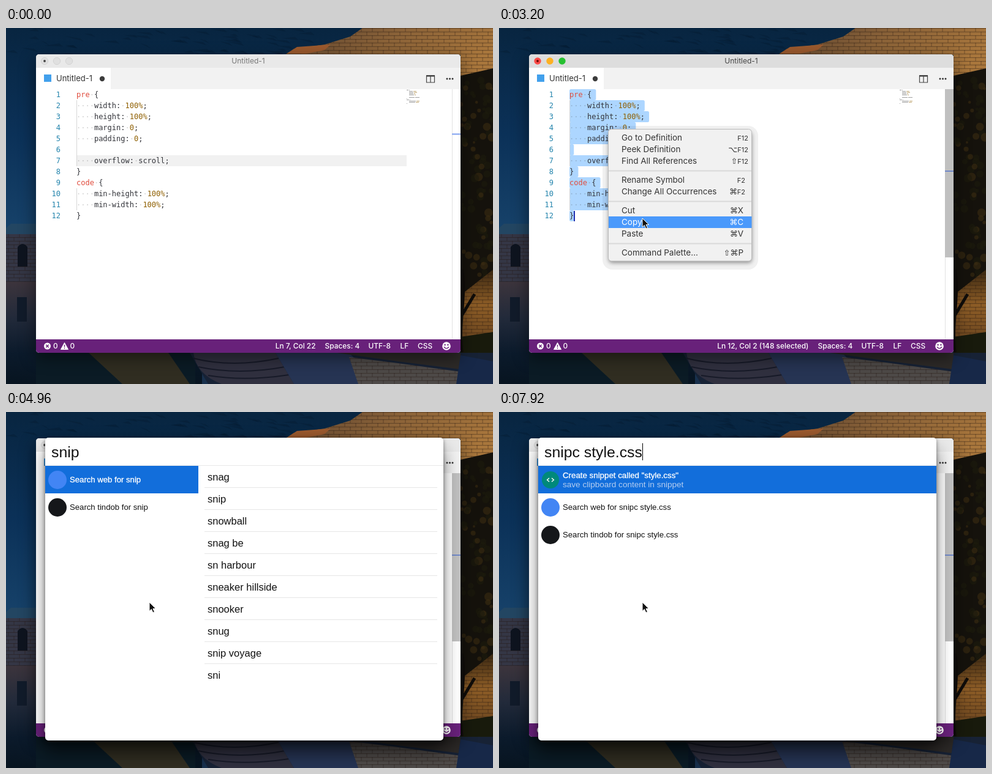
These frames come from a looping animation (795 px wide and 582 px high, 8000 ms). An HTML page:

```html
<!DOCTYPE html>
<html lang="en">
<head>
<meta charset="utf-8">
<title>Snippet from clipboard</title>
<style>
html, body { margin: 0; width: 100%; height: 100%; overflow: hidden; background: #0a2440; }
svg { display: block; width: 100vw; height: 100vh; }
text { white-space: pre; }
.ui { font-family: Inter, "Open Sans", sans-serif; }
.code { font: 12px "DejaVu Sans Mono", monospace; }
.find { font-family: "Liberation Sans", Arial, sans-serif; }
.key { font-family: "DejaVu Sans", sans-serif; }
</style>
</head>
<body>
<svg viewBox="0 0 795 582" xmlns="http://www.w3.org/2000/svg">
  <defs>
    <linearGradient id="sky" x2="0" y2="1">
      <stop offset="0" stop-color="#082540"/><stop offset=".3" stop-color="#0b3158"/>
      <stop offset=".56" stop-color="#164169"/><stop offset=".6" stop-color="#18304c"/>
    </linearGradient>
    <linearGradient id="water" x2="0" y2="1">
      <stop offset="0" stop-color="#3c343c"/><stop offset=".35" stop-color="#222a3a"/>
      <stop offset=".7" stop-color="#0b1a2b"/><stop offset="1" stop-color="#071420"/>
    </linearGradient>
    <linearGradient id="fort" x2="1" y2=".4">
      <stop offset="0" stop-color="#57402f"/><stop offset=".5" stop-color="#8a6238"/>
      <stop offset="1" stop-color="#a8763c"/>
    </linearGradient>
    <linearGradient id="lit" x2="0" y2="1">
      <stop offset="0" stop-color="#3a2812"/><stop offset=".5" stop-color="#8c5c26"/>
      <stop offset="1" stop-color="#6d4720"/>
    </linearGradient>
    <pattern id="bricks" width="18" height="12" patternUnits="userSpaceOnUse">
      <path d="M0 .5H18M0 6.5H18M4 0V6M13 6V12" stroke="#20140c" stroke-opacity=".4" fill="none"/>
    </pattern>
    <filter id="soft" x="-30%" y="-60%" width="160%" height="240%"><feGaussianBlur stdDeviation="14"/></filter>
    <filter id="near" x="-20%" y="-20%" width="140%" height="140%"><feGaussianBlur stdDeviation="3"/></filter>
    <clipPath id="frame"><rect x="49" y="43" width="693" height="488" rx="5"/></clipPath>
  </defs>
  <g id="photo"></g>
  <g id="scene"></g>
</svg>
<script>
const LOOP = 8000, STEP = 80, CHAR = 7.224;
const SOURCE = `pre {
    width: 100%;
    height: 100%;
    margin: 0;
    padding: 0;

    overflow: scroll;
}
code {
    min-height: 100%;
    min-width: 100%;
}`.split('\n');
const QUERY = 'snipc style.css';
// [time, characters typed]
const KEYS = [[3920, 0], [4240, 1], [4320, 2], [4480, 4], [5280, 5], [5440, 6], [5680, 7], [5840, 8],
  [6000, 9], [6240, 10], [6320, 11], [6480, 12], [6720, 13], [6800, 14], [6960, 15]];
const HINTS = ['snag', 'snip', 'snowball', 'snag be', 'sn harbour', 'sneaker hillside', 'snooker',
  'snug', 'snip voyage', 'sni'];
// [centre y, label, modifiers, key, right edge]
const MENU = [
  [179, 'Go to Definition', '', 'F12', 407], [198, 'Peek Definition', '⌥', 'F12', 407],
  [217, 'Find All References', '⇧', 'F12', 407], [248, 'Rename Symbol', '', 'F2', 402],
  [267, 'Change All Occurrences', '⌘', 'F2', 402], [298, 'Cut', '⌘', 'X', 399],
  [317, 'Copy', '⌘', 'C', 399], [336, 'Paste', '⌘', 'V', 399],
  [367, 'Command Palette…', '⇧⌘', 'P', 399]];

const rect = (x, y, w, h, fill, more = '') =>
  `<rect x="${x}" y="${y}" width="${w}" height="${h}" fill="${fill}" ${more}/>`;
const disc = (x, y, r, fill, more = '') => `<circle cx="${x}" cy="${y}" r="${r}" fill="${fill}" ${more}/>`;
const path = (d, fill, more = '') => `<path d="${d}" fill="${fill}" ${more}/>`;
const label = (x, y, str, cls, size, fill, more = '') =>
  `<text x="${x}" y="${y}" class="${cls}" font-size="${size}" fill="${fill}" ${more}>${str}</text>`;
const group = (list, fn) => list.map(fn).join('');
const lineTop = n => 100 + 18 * n;

const ruler = document.createElement('canvas').getContext('2d');
ruler.font = '24.8px "Liberation Sans", Arial, sans-serif';

function photo() {
  let seed = 7;
  const rnd = () => (seed = seed * 16807 % 2147483647) / 2147483647;
  const fort = 'M455 44L470 34 520 27 562 14 582 0H795V90L742 78V44Z';
  const wall = 'M0 337H49V415H0Z';
  const quay = 'M560 538L640 548 742 562V582H575Z';
  let out = rect(0, 0, 795, 582, 'url(#sky)');
  for (let i = 0; i < 60; i++)
    out += path(`M${rnd() * 480} ${rnd() * 42}l${8 + rnd() * 18} ${rnd() * 8 - 4}l6 5z`, '#061a2e', 'opacity=".35"');
  out += path(fort, 'url(#fort)') + path(fort, 'url(#bricks)')
    + path('M458 42L475 31 530 27 520 36 490 42Z', '#9c5a2e')
    + path('M742 78L795 66V582H742Z', '#15120c');
  for (let i = 0; i < 90; i++)
    out += disc(742 + rnd() * 53, 80 + rnd() * 340, 2 + rnd() * 5, rnd() < .4 ? '#3a2b12' : '#1c1a0e', 'opacity=".6"');
  out += path('M748 432L795 395V500L742 510Z', 'url(#lit)') + path('M748 432L795 395V500L742 510Z', 'url(#bricks)')
    + path('M742 505L795 497V545L742 535Z', '#181a0c')
    + path('M744 395C752 440 738 480 744 530M744 470L765 435', 'none', 'stroke="#100d0a" stroke-width="5"')
    + path('M8 320H49V337H0V327Z', '#234662') + path(wall, '#343645') + path(wall, 'url(#bricks)')
    + path('M19 390V358Q27 348 35 358V390Z', '#0e141f')
    + rect(0, 415, 320, 167, 'url(#water)')
    + path('M18 440H34V480H18Z', '#111b2a')
    + rect(49, 531, 260, 51, '#0b1b25')
    + path('M135 531H265L300 582H190Z', '#57411f', 'opacity=".5"')
    + path('M300 531H795V582H330Z', '#172235')
    + path('M306 531H440L470 582H352Q310 566 306 531Z', '#30303f')
    + path('M306 540Q370 556 445 540M314 554Q380 568 455 554M330 568Q390 578 462 567', 'none',
      'stroke="#171a28" stroke-width="2"')
    + path('M440 531H560L610 582H470Z', '#263453')
    + path(quay, '#4e4a48') + path(quay, 'url(#bricks)')
    + path('M540 531H742V558L640 545Z', '#2d2a28')
    + path('M742 535L795 545V582H735Z', '#172848');
  return out;
}

function codeLine(line, n) {
  const paint = (s, c) => `<tspan fill="${c}">${s}</tspan>`;
  const body = line.replace(/( +)|(\d+%?)|(^[a-z]+)/g, (s, gap, num) =>
    gap ? paint('·'.repeat(s.length), 'rgba(60,60,60,.24)') : paint(s, num ? '#8f5f00' : '#e04b3c'));
  const y = lineTop(n) + 13;
  return `<text x="115" y="${y}" class="code" fill="#33343a">${body}</text>`
    + `<text x="89" y="${y}" class="code" fill="#2585ad" text-anchor="end">${n + 1}</text>`;
}

const minimap = group(SOURCE, (line, n) => group([...line.matchAll(/\S+/g)], m =>
  rect(654 + m.index, 101 + 2 * n, m[0].length, 1, /\d/.test(m[0]) ? '#8f5f00' : '#555', 'opacity=".55"')));
const listing = group(SOURCE, codeLine);

function selection(fill) {
  return group(SOURCE, (line, n) => {
    const last = n === SOURCE.length - 1;
    return rect(115, lineTop(n), (line.length + !last) * CHAR, 18, fill, 'rx="2.5"');
  });
}

function statusBar(place) {
  const item = (x, s, more) => label(x, 524, s, 'ui', 11.9, '#fff', `font-weight="500" ${more || ''}`);
  return rect(49, 509, 693, 22, '#68217a')
    + disc(67.5, 520, 5.5, '#fff') + path('M65.3 517.8l4.4 4.4m0-4.4l-4.4 4.4', 'none', 'stroke="#68217a" stroke-width="1.5"')
    + item(77, '0') + path('M95.5 514.5L101.5 525.5H89.5Z', '#fff', 'stroke="#fff" stroke-linejoin="round"')
    + path('M95.5 518v3.5m0 1.2v1.5', 'none', 'stroke="#68217a" stroke-width="1.4"') + item(104.5, '0')
    + item(505.5, place, 'text-anchor="end"') + item(520.5, 'Spaces: 4') + item(591.5, 'UTF-8')
    + item(643.5, 'LF') + item(672, 'CSS')
    + disc(719, 520, 6.8, '#fff') + disc(716.6, 518, 1.2, '#68217a') + disc(721.4, 518, 1.2, '#68217a')
    + path('M715 521.3Q719 526.5 723 521.3', 'none', 'stroke="#68217a" stroke-width="1.4"');
}

function editor(t) {
  const active = t >= 1040 && t < 3920, picked = t >= 1440, hover = t >= 560;
  const lights = ['#fc4b48', '#fdb123', '#27c131'];
  let out = rect(49, 52, 693, 486, '#000', 'opacity=".5" filter="url(#soft)"') + '<g clip-path="url(#frame)">'
    + rect(49, 43, 693, 488, '#fff')
    + rect(49, 43, 693, 22, active ? '#dddddd' : '#e9e9e9')
    + group(lights, (c, i) => disc(63 + 20 * i, 54, 5.7, active ? c : '#e0e0e0',
      active ? '' : 'stroke="#d2d2d2"'))
    + disc(63, 54, 1.9, active ? '#6e0a08' : '#444')
    + label(395.5, 58, 'Untitled-1', 'ui', 12, active ? '#444' : '#777', 'text-anchor="middle"')
    + rect(49, 65, 693, 35, '#f2f2f2') + rect(49, 65, 122, 35, '#fff')
    + rect(62, 76, 12, 12, '#42a0ec')
    + label(82, 87, 'Untitled-1', 'ui', 13, '#333') + disc(157, 83, 4.2, '#3c3c3c')
    + path('M686.5 78H699.5V89H686.5ZM693 78V89', 'none', 'stroke="#444" stroke-width="1.2"')
    + rect(686, 77, 14, 2.5, '#444')
    + group([720, 724.5, 729], x => disc(x, 83, 1.5, '#333'));
  if (picked) out += selection(active ? '#add6ff' : '#d3e8ff');
  else out += rect(115, 208, 539, 18, '#f1f1f1');
  out += rect(115, 118, 1, 108, '#d6d6d6') + rect(115, 262, 1, 36, '#d6d6d6') + listing + minimap
    + rect(728, 100, 1, 409, '#e2e2e2');
  if (hover) out += rect(728, 100, 14, 275, '#c0c0c0');
  out += rect(728, picked ? 233 : 172.5, 14, 2, picked ? '#7088c8' : '#7fa0f0');
  if (active) out += picked ? rect(122, 299, 2, 17, '#2030b0') : rect(266, 208, 2, 18, '#2030b0');
  return out + statusBar(picked ? 'Ln 12, Col 2 (148 selected)' : 'Ln 7, Col 22') + '</g>';
}

function menu(t, y) {
  if (t < 2080 || t >= 3520) return '';
  const live = t >= 2320 && t !== 3280;
  const rows = group(MENU, ([mid, name, mods, key, right]) => {
    const on = live && y >= mid - 9 && y < mid + 10, ink = on ? '#fff' : '#333';
    const small = key[0] === 'F';
    const keys = (mods && `<tspan class="key" font-size="13">${mods}</tspan>`) + key;
    return (on ? rect(179, mid - 9, 233.5, 19, '#4a99fb') : '') + label(200, mid + 5, name, 'ui', 13.5, ink)
      + label(right, mid + 5, keys, 'ui', small ? 11 : 13.5, ink, 'text-anchor="end"');
  });
  return `<g opacity="${t === 3440 ? .5 : 1}">` + rect(169, 160, 254, 235, '#000', 'rx="16" opacity=".06"')
    + rect(179, 170, 234, 214, '#000', 'rx="6" opacity=".4" filter="url(#near)"')
    + rect(178.5, 165.5, 234, 215.5, '#f1f1f1', 'rx="5" stroke="#bcbcbc"')
    + group([233, 283, 352], s => rect(179, s - .5, 233, 2, '#d9d9d9')) + rows + '</g>';
}

function result(row, icon, text, sub, lit) {
  const y = 88 + 45 * row, ink = lit ? '#fff' : '#111';
  const edge = lit ? 'stroke="#fff" stroke-width=".3"' : '';
  return icon(y + 23) + label(104, y + (sub ? 20 : 27), text, 'find', sub ? 13.3 : 13.15, ink, edge)
    + (sub ? label(104, y + 35, sub, 'find', 13.55, '#b4cdf0') : '');
}

function finder(t) {
  if (t < 3920) return '';
  const [since, count] = KEYS.filter(k => k[0] <= t).pop();
  const typed = QUERY.slice(0, count), query = typed.trim(), open = count > 1, wide = count > 4;
  const h = open ? 495 : 45;
  const box = (dy, more) => rect(64, 42 + dy, 650, h, '#000', `rx="5" ${more}`);
  let out = box(20, 'opacity=".48" filter="url(#soft)"') + box(2, 'opacity=".45" filter="url(#near)"')
    + rect(64, 42, 650, h, '#fff', 'rx="5"');
  out += count ? label(74, 74, typed, 'find', 24.8, '#111') : label(75, 74, 'Cerebro Search', 'find', 24, '#777');
  if ((t - since) % 960 < 480) out += rect(Math.round(74 + ruler.measureText(typed).width), 51, 1, 28, '#000');
  if (!open) return out;

  const web = y => disc(84, y, 15, '#4285f4', t < 4480 ? 'stroke="#8ab4f8" opacity=".85"' : '');
  const hub = y => disc(84, y, 15, '#15171a');
  const snippet = y => disc(84, y, 14, '#00897b')
    + path(`M82 ${y - 3}l-3.4 3 3.4 3m4-6l3.4 3-3.4 3`, 'none', 'stroke="#fff" stroke-width="1.4"');
  const first = wide ? 1 : 0, name = query.slice(6);
  out += rect(64, 87, 650, 1, '#e8e8e8') + rect(64, 88, wide ? 650 : 250, 45, '#126edb');
  if (wide) out += result(0, snippet, name ? `Create snippet called "${name}"` : "Snippet name can't be empty",
    'save clipboard content in snippet', true);
  out += result(first, web, 'Search web for ' + query, '', !wide)
    + result(first + 1, hub, 'Search tindob for ' + query, '');
  if (!wide) out += group(HINTS, (s, i) => label(329, 112 + 36 * i, s, 'find', 16.5, '#111')
    + (i < 9 ? rect(324, 123 + 36 * i, 380, 1, '#e6e6e6') : ''));
  return out;
}

// [start, end, from x, from y, to x, to y]
const MOVES = [[80, 560, 9, 330, 150, 205], [1360, 1760, 150, 205, 179, 169], [2240, 3120, 179, 169, 234, 311]];
function pointerAt(t) {
  const [a, b, x0, y0, x1, y1] = MOVES.filter(m => m[0] < t).pop() || MOVES[0];
  const p = Math.min(1, Math.max(0, (t - a) / (b - a))), e = p * p * (3 - 2 * p);
  return [x0 + (x1 - x0) * e, y0 + (y1 - y0) * e];
}

function pointer(t, [x, y]) {
  if (t < 160) return '';
  return path('M0 0V14.5L3.4 11.4 5.9 17 8.4 15.9 6 10.5H10.5Z', '#111',
    `transform="translate(${x} ${y})" stroke="#fff" stroke-width="1"`);
}

const scene = document.getElementById('scene');
document.getElementById('photo').innerHTML = photo();
let shown = -1;
function update(now) {
  const t = Math.floor(now % LOOP / STEP) * STEP;
  if (t !== shown) {
    shown = t;
    const at = pointerAt(t);
    scene.innerHTML = editor(t) + menu(t, at[1]) + finder(t) + pointer(t, at);
  }
}
const start = performance.now();
function tick() {
  update(performance.now() - start);
  requestAnimationFrame(tick);
}
tick();
</script>
</body>
</html>
```
